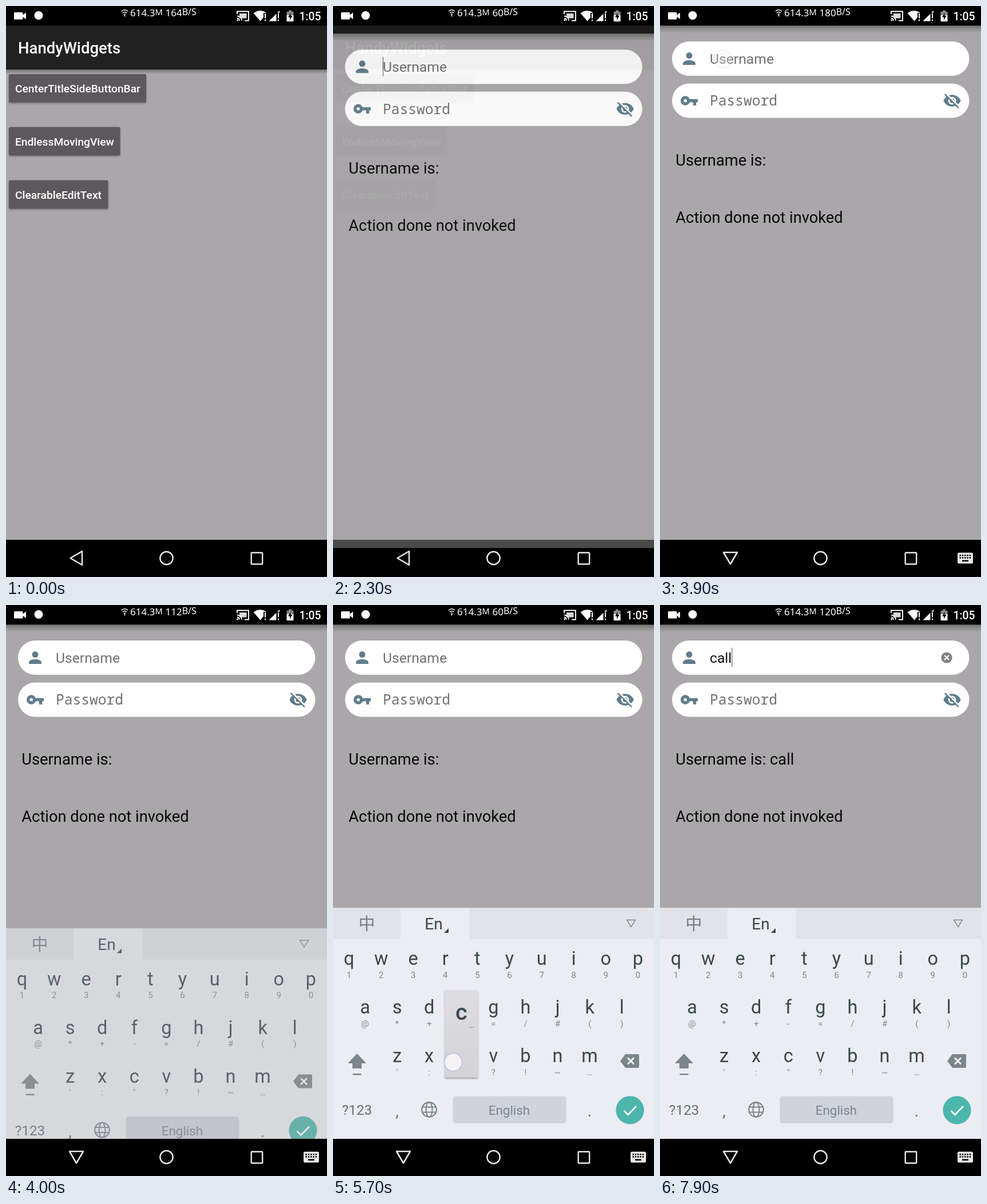
An HTML page that plays this animation: 561x998 px, repeating every 8 s.

```html
<!DOCTYPE html>
<html lang="en">
<head>
<meta charset="utf-8">
<title>HandyWidgets</title>
<style>
html, body { margin: 0; width: 100%; height: 100%; overflow: hidden; background: #000; }
svg { display: block; width: 561px; height: 998px; font-family: Roboto, sans-serif; }
.mid { text-anchor: middle; }
.net { font-family: "Noto Sans", "Open Sans", sans-serif; }
.mono { font-family: "Noto Sans Mono", monospace; }
.cjk { font-family: "Noto Sans CJK SC", "Noto Sans CJK", sans-serif; font-weight: 300; }
text { white-space: pre; }
</style>
</head>
<body>
<svg id="stage" viewBox="0 0 561 998"></svg>
<script>
const LOOP = 8000, STEP = 100;
const INK = '#37474f', HINT = '#7f888d', ICON = '#607d8b', PAGE = '#a9a7a9';

const text = (x, y, size, fill, s, more = '') =>
  `<text x="${x}" y="${y}" font-size="${size}" fill="${fill}" ${more}>${s}</text>`;
const mid = (x, y, size, fill, s, more = '') => text(x, y, size, fill, s, 'class="mid" ' + more);
const rect = (x, y, w, h, fill, more = '') =>
  `<rect x="${x}" y="${y}" width="${w}" height="${h}" fill="${fill}" ${more}/>`;
const path = (d, fill, more = '') => `<path d="${d}" fill="${fill}" ${more}/>`;
const line = (d, color, w, more = '') =>
  `<path d="${d}" fill="none" stroke="${color}" stroke-width="${w}" ${more}/>`;
const circle = (x, y, r, fill, more = '') => `<circle cx="${x}" cy="${y}" r="${r}" fill="${fill}" ${more}/>`;
const group = (id, body, more = '') => `<g id="${id}" ${more}>${body}</g>`;
const icon = (x, y, body) => `<g transform="translate(${x} ${y}) scale(1.365) translate(-12 -12)">${body}</g>`;

const defs = `<defs>
  <linearGradient id="shade" x1="0" y1="0" x2="0" y2="1">
    <stop offset="0" stop-opacity=".32"/><stop offset="1" stop-opacity="0"/>
  </linearGradient>
  <linearGradient id="pop" x1="0" y1="0" x2="0" y2="1">
    <stop offset="0" stop-color="#dddce0"/><stop offset="1" stop-color="#d3d2d7"/>
  </linearGradient>
  <filter id="drop" x="-20%" y="-20%" width="140%" height="150%">
    <feDropShadow dx="0" dy="2" stdDeviation="1.6" flood-opacity=".32"/>
  </filter></defs>`;

function button(y, w, label) {
  return rect(5, y, w, 49.5, '#5b595c', 'rx="2.5" filter="url(#drop)"') +
    text(16, y + 32.3, 19.2, '#fff', label, 'font-weight="500"');
}

function home() {
  return rect(0, 34, 561, 899, PAGE) + rect(0, 111, 561, 8, 'url(#shade)') +
    rect(0, 34, 561, 77, '#212121') +
    text(21, 83, 27.5, '#fff', 'HandyWidgets', 'font-weight="500"') +
    button(119, 240, 'CenterTitleSideButtonBar') +
    button(211.5, 194.5, 'EndlessMovingView') +
    button(304.5, 173.5, 'ClearableEditText') +
    rect(5, 304.5, 173.5, 49.5, '#fff', 'id="ripple" rx="2.5" opacity=".14"');
}

function form() {
  const person = circle(12, 8, 4, ICON) + path('M12 14c-2.7 0-8 1.3-8 4v2h16v-2c0-2.7-5.3-4-8-4z', ICON);
  const key = circle(7, 12, 4, 'none', `stroke="${ICON}" stroke-width="4"`) + path('M12 10h11v4h-2v4h-4v-4h-5z', ICON);
  const eye = path('M1 12C2.7 7.6 7 4.5 12 4.5S21.3 7.6 23 12C21.3 16.4 17 19.5 12 19.5S2.7 16.4 1 12Z', ICON) +
    circle(12, 12, 5, '#fff') + circle(12, 12, 3, ICON) +
    line('M3.9 2.4L22 20.5', '#fff', 1.9) + line('M2.6 3.6L20.4 21.4', ICON, 1.8);
  const clear = circle(501, 92, 9.6, '#828282') + line('M497 88l8 8m0-8l-8 8', '#fff', 2.1);
  return rect(0, 34, 561, 899, PAGE) + rect(0, 34, 561, 13, 'url(#shade)') +
    rect(21, 62, 519.5, 60, '#fff', 'rx="30"') + rect(21, 135.5, 519.5, 60, '#fff', 'rx="30"') +
    icon(51, 92, person) + icon(51, 165.5, key) + icon(510.5, 165.5, eye) +
    text(87, 100.7, 24.7, '#737173', 'Username', 'id="hint"') +
    text(87, 100.7, 24.7, '#111', '', 'id="typed"') +
    rect(88, 102.5, 0, 1.5, '#222', 'id="under"') +
    rect(87, 74.5, 1, 34, '#555', 'id="cursor"') + group('clear', clear) +
    text(87, 174.3, 24.6, '#737173', 'Password', 'class="mono"') +
    text(27.3, 279, 27.3, '#080808', '', 'id="echo"') +
    text(27.3, 379, 27.3, '#080808', 'Action done not invoked');
}

const ROWS = [
  ['qwertyuiop', '1234567890', 28, 629],
  ['asdfghjkl', '@*+-=/#()', 56, 714],
  ['zxcvbnm', '\':"?!~…', 112, 799]
];

function keyboard() {
  const keys = ROWS.map(([row, hints, x0, y]) => [...row].map((c, i) => {
    const x = x0 + i * 56.1;
    return mid(x, y, 32.5, INK, c) + mid(x, y + 22.5, 15, HINT, hints[i]);
  }).join('')).join('');
  const tabs = rect(118, 530, 120, 55, '#ebedf2') +
    mid(59, 568, 29, '#747d83', '中', '').replace('class="mid"', 'class="mid cjk"') +
    mid(176, 567, 28, INK, 'En') + path('M202 565v8h-8z', INK) +
    line('M513.5 550.5h15l-7.5 12z', '#858c91', 1.5);
  const words = [45, 146, 247, 340, 442].map((x, i) =>
    mid(x, 566.5, 23.4, i ? '#6a7278' : '#111', '', `id="w${i}"`)).join('') +
    [92.5, 201, 294.5, 387.5, 500.5].map(x => rect(x - .5, 543, 1, 30, '#c3c7cd')).join('') +
    line('M523.5 554l7 7 7-7', '#747d83', 2.4);
  const gray = '#7b868c';
  const globe = circle(168, 882, 12.8, 'none', `stroke="${gray}" stroke-width="2.2"`) +
    line('M155.5 877.5h25m-25 9h25', gray, 2) +
    `<ellipse cx="168" cy="882" rx="5.5" ry="12.8" fill="none" stroke="${gray}" stroke-width="2"/>`;
  return rect(0, 529.5, 561, 403.5, '#ebedf2') + rect(0, 529.5, 561, 54.5, '#e1e3e8') +
    group('tabs', tabs) + group('words', words) + keys +
    path('M42 784l16 17h-8v9H34v-9h-8z', gray) + rect(34.5, 819, 15, 2.5, gray) +
    path('M502 797l9-12h22q2 0 2 2v20q0 2-2 2h-22z', gray) + line('M515 791.5l11 11m0-11l-11 11', '#fff', 2.6) +
    mid(42, 891, 24.4, '#667279', '?123') + mid(112, 894, 28, '#667279', ',') + globe +
    rect(209.5, 858.5, 198, 47.5, '#d0d3da', 'rx="5"') + mid(308, 891, 22.4, gray, 'English') +
    mid(448.5, 894, 28, '#667279', '.') +
    circle(519, 882.8, 24.6, '#4db6ac') + line('M508.5 884l7 7 14.5-15', '#fff', 2.8);
}

function statusBar() {
  const w = '#fff';
  const arcs = 'M202 9.3q5.5-5 11 0m-9 2.8q3.5-3.2 7 0m-5.2 2.6q1.7-1.5 3.4 0';
  return rect(0, 0, 561, 34.3, '#000') +
    rect(14, 11, 15.5, 12.5, w, 'rx="1.5"') + path('M29 16l6-4.5v11.5l-6-4.5z', w) +
    circle(57, 16.5, 7.5, w) +
    line(arcs, w, 1.5) + circle(207.5, 17, 1.2, w) +
    `<text x="217" y="18" font-size="17" fill="#fff" class="net">614.3</text>` +
    text(260.5, 15.5, 14.5, w, 'M', 'class="net"') +
    `<text x="278.5" y="18" font-size="17" fill="#fff" class="net"><tspan id="speed"></tspan><tspan dy="-2.5" font-size="16">B/S</tspan></text>` +
    line('M404 14V9.5h20v16h-7M404 17.5a8 8 0 0 1 8 8m-8-4a4 4 0 0 1 4 4', w, 1.9) +
    rect(408, 13, 12.5, 8.5, w, 'opacity=".85"') + circle(404.8, 24.8, 1.5, w) +
    path('M432.5 12.5q11.5-8.5 23.5 0l-11.5 14z', w) + rect(450, 12, 6.5, 16, '#000') +
    path('M478 8v18.5h-18.5z', w) + rect(472.5, 12, 6, 16, '#000') +
    line('M453 13v8.5m0 2v2.8M476 13v8.5m0 2v2.8', w, 2) +
    rect(494, 7.5, 5, 3, '#8a8a8a') + rect(490.5, 10, 12, 6, '#8a8a8a') + rect(490.5, 16, 12, 11, w) +
    path('M497.5 12l-4.5 7.5h3v5l4.5-7.5h-3z', '#000') +
    text(512.5, 24.5, 19.3, w, '1:05', 'font-weight="500"');
}

function navBar() {
  const s = '#e8e8e8';
  let dots = '';
  for (let i = 0; i < 10; i++) dots += rect(523.5 + i % 5 * 4.3, 959 + (i / 5 | 0) * 4.2, 2.5, 2.5, '#000');
  const board = rect(520, 955.5, 27, 19, s, 'rx="2.5"') + dots + rect(528, 968.5, 11, 2.5, '#000');
  return rect(0, 933, 561, 65, '#000') + rect(0, 933, 561, 0, '#4f4f4f', 'id="lip"') +
    line('M112.5 965l20.5-12v24z', s, 2.5, 'id="back" stroke-linejoin="round"') +
    circle(280.5, 965, 11.2, 'none', `stroke="${s}" stroke-width="2.4"`) +
    rect(428.7, 955.5, 19.5, 20, 'none', `stroke="${s}" stroke-width="2.4" rx="1"`) +
    group('board', board);
}

const stage = document.getElementById('stage');
stage.innerHTML = defs + rect(0, 0, 561, 998, '#000') + group('home', home()) + group('form', form()) +
  group('keys', keyboard()) +
  group('popup', rect(0, 0, 58, 0, 'url(#pop)', 'id="popBox" rx="3" filter="url(#drop)"') +
    mid(0, 0, 39, INK, '', 'id="popKey" font-weight="500"') + mid(0, 0, 17, HINT, '…', 'id="popDots"')) +
  navBar() + statusBar() +
  circle(0, 0, 15.5, '#f6f4fa', 'id="touch" stroke="#c3bfe0" stroke-width="1.6" fill-opacity=".92"');

const el = {};
stage.querySelectorAll('[id]').forEach(n => el[n.id] = n);

const SPEED = [[0, 164], [400, 112], [1700, 60], [2800, 180], [4000, 112], [4800, 164], [5100, 60], [6300, 164], [7800, 120]];
const TYPED = [[0, ''], [5900, 'c'], [6200, 'ca'], [6400, 'cal'], [6700, 'call']];
const COMMIT = 7300;
const WORDS = {
  c: ['can', 'come', 'could', 'call'],
  ca: ['can', 'call', 'came', 'cannot'],
  cal: ['calcium', 'call', 'calm', 'calming'],
  call: ['calling', 'calls', 'caller', 'called']
};
const CURSOR = [[2200, 3000], [3500, 3900], [5000, 5500], [5900, 7500], [7900, 8000]];
const TAPS = [
  { x: 110, y: 329, from: 1900, to: 2100 },
  { x: 110, y: 93, from: 3600, to: 3900 },
  { x: 210, y: 799, from: 5500, to: 5900, pop: 5700, key: 'c', px: 224.3, top: 673 },
  { x: 55, y: 709, from: 6000, to: 6200, pop: 6000, key: 'a', px: 56, top: 580 },
  { x: 498, y: 709, from: 6300, to: 6400, pop: 6300, key: 'l', px: 499, top: 580 },
  { x: 498, y: 709, from: 6500, to: 6700, pop: 6500, key: 'l', px: 499, top: 580 },
  { x: 247, y: 560, from: 7100, to: 7300 }
];

const clamp = v => Math.max(0, Math.min(1, v));
const part = (t, start, len) => clamp((t - start) / len);
const slow = (p, n) => 1 - (1 - p) ** n;
const at = (list, t) => list.filter(e => e[0] <= t).pop()[1];
const set = (n, a) => { for (const k in a) n.setAttribute(k, a[k]); };
const show = (n, on) => { n.style.display = on ? '' : 'none'; };

function drawField(t) {
  const s = at(TYPED, t), composing = s && t < COMMIT;
  el.typed.textContent = s;
  el.echo.textContent = 'Username is: ' + s;
  const w = s ? el.typed.getComputedTextLength() : 0;
  show(el.hint, !s);
  show(el.clear, s);
  set(el.under, { width: composing ? w : 0 });
  set(el.cursor, { x: 87 + w });
  show(el.cursor, CURSOR.some(([a, b]) => t >= a && t < b));
  show(el.tabs, !composing);
  show(el.words, composing);
  if (composing) [s, ...WORDS[s]].forEach((word, i) => el['w' + i].textContent = word);
}

function drawTouch(t) {
  const tap = TAPS.find(p => t >= p.from && t < p.to + STEP);
  show(el.touch, tap);
  if (tap) set(el.touch, { cx: tap.x, cy: tap.y, opacity: t < tap.to ? 1 : .28 });
  const pop = tap && tap.key && t >= tap.pop && t < tap.to;
  show(el.popup, pop);
  if (!pop) return;
  const { px, top } = tap;
  set(el.popBox, { x: px - 29, y: top, height: top > 600 ? 153 : 160 });
  set(el.popKey, { x: px, y: top + 52 });
  set(el.popDots, { x: px + 18, y: top + 66 });
  el.popKey.textContent = tap.key;
}

function draw(ms) {
  const t = Math.floor(ms % LOOP / STEP) * STEP;
  const rise = 80 * (1 - slow(part(t, 2198, 350), 5));
  const fade = slow(part(t, 2198, 200), 4);
  set(el.form, { transform: `translate(0 ${rise})`, opacity: fade });
  set(el.home, { opacity: 1 - .3 * part(t, 2198, 217) });
  show(el.home, t < 2500);
  show(el.ripple, t >= 1900 && t < 2400);
  set(el.lip, { height: Math.min(65, rise), opacity: fade });

  const open = slow(part(t, 3900, 300), 3);
  set(el.keys, { transform: `translate(0 ${120 * (1 - open)})`, opacity: open });
  show(el.keys, open > 0);
  set(el.back, { transform: `rotate(${-90 * part(t, 3600, 200)} 123 965)` });
  show(el.board, t >= 3800);

  el.speed.textContent = at(SPEED, t);
  drawField(t);
  drawTouch(t);
}

const begin = performance.now();
function tick() {
  draw(performance.now() - begin);
  requestAnimationFrame(tick);
}
tick();
</script>
</body>
</html>
```
